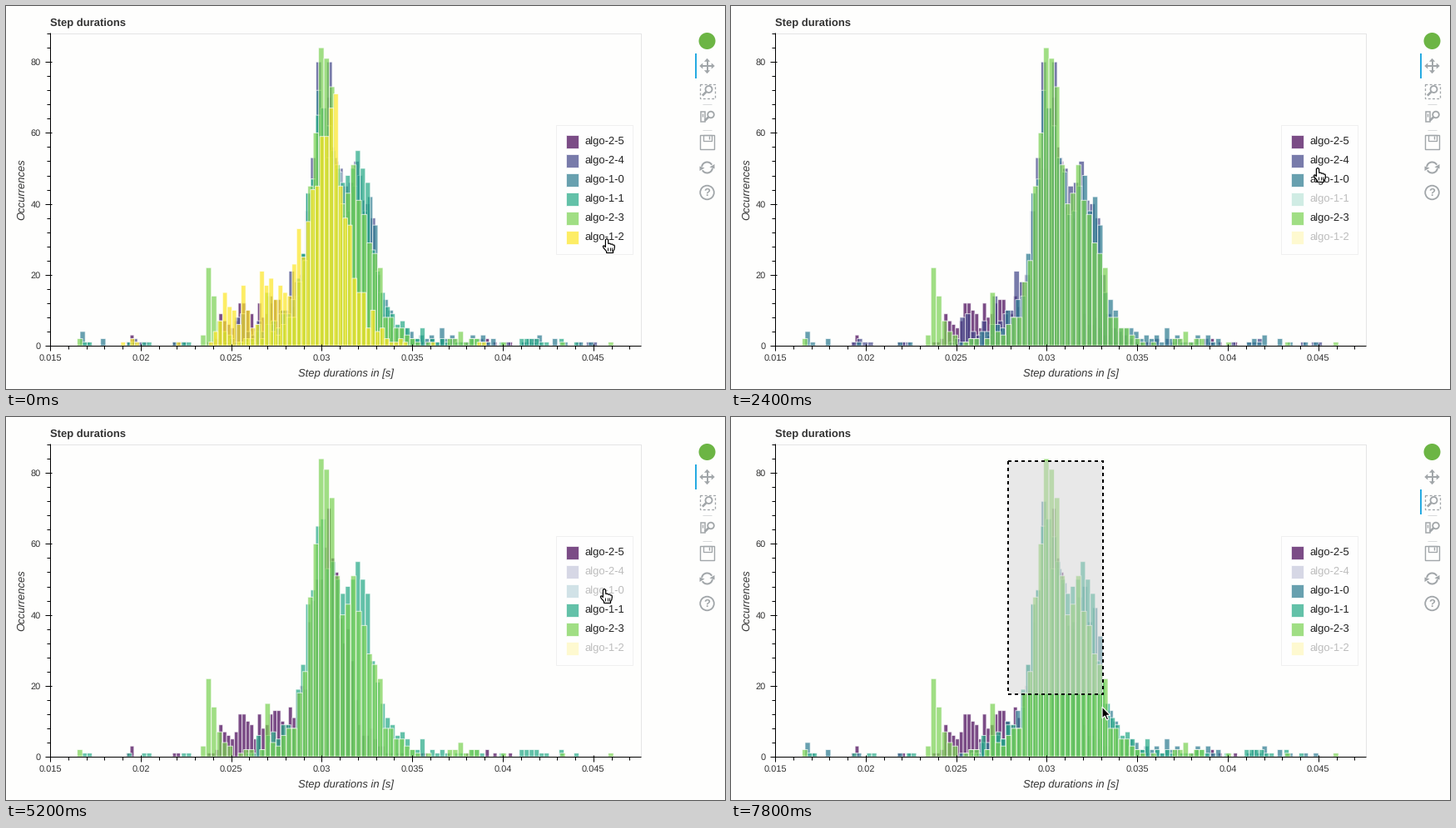
These frames come from a looping animation (864 by 460 pixels, 8 s). A matplotlib script:

```python
import numpy as np
import matplotlib.pyplot as plt
from matplotlib.animation import FuncAnimation
from matplotlib.collections import PolyCollection
from matplotlib.patches import Arc, Circle, Polygon, Rectangle

W, H, DPI = 864, 460, 80
STEP, FRAMES = 200, 40
PX = 72 / DPI  # points per pixel
LEFT, RIGHT, TOP, BASE = 53, 763, 32, 408
UNIT_X, UNIT_Y = 21.76, 4.26  # pixels per 0.001 s and per occurrence
GREY = "#a1a6a9"

plt.rcParams["font.family"] = "Liberation Sans"
plt.rcParams["text.hinting"] = "none"

fig = plt.figure(figsize=(W / DPI, H / DPI), dpi=DPI, facecolor="#fefefd")
ax = fig.add_axes([0, 0, 1, 1])
ax.set_xlim(0, W)
ax.set_ylim(H, 0)
ax.axis("off")


def line(xs, ys, color="black", lw=1.0, z=4, **kw):
    kw.setdefault("solid_capstyle", "butt")
    return ax.plot(xs, ys, color=color, lw=lw * PX, zorder=z, **kw)[0]


def box(x0, y0, x1, y1, z=4, lw=1.0, **kw):
    return ax.add_patch(Rectangle((x0, y0), x1 - x0, y1 - y0, lw=lw * PX, zorder=z, **kw))


def poly(pts, z=5, lw=1.0, **kw):
    return ax.add_patch(Polygon(pts, closed=True, lw=lw * PX, zorder=z, **kw))


def label(x, y, s, size, **kw):
    opts = dict(ha="center", va="center_baseline", color="#333333", zorder=5)
    opts.update(kw)
    return ax.text(x, y, s, fontsize=size * PX, **opts)


def histogram(name, color, x0, width, runs):
    """Bars of one series; runs maps the first bin of a run to its counts."""
    quads = []
    for first, counts in runs.items():
        for k, n in enumerate(counts, first):
            if n:
                a, b, top = x0 + k * width, x0 + (k + 1) * width, BASE - n * UNIT_Y
                quads.append([(a, BASE), (a, top), (b, top), (b, BASE)])
    bars = PolyCollection(quads, facecolors=[(*color, 0.7)], edgecolors=[(1, 1, 1, 0.7)],
                          linewidths=PX, zorder=2)
    bars.set_snap(False)
    ax.add_collection(bars, autolim=False)
    return name, color, bars


def rgb(code):
    return tuple(int(code[i:i + 2], 16) / 255 for i in (0, 2, 4))


series = [
    histogram("algo-2-5", rgb("440154"), 144.5, 4.64, {
        0: [1, 3], 12: [1, 1], 21: [1, 1, 2],
        24: [9, 7, 6, 5, 7, 12, 12, 10, 9, 5, 12, 8, 9, 12, 13, 13, 10, 9, 14, 11],
        44: [18, 20, 19, 38, 44, 50, 50, 59, 70, 56, 52, 39, 32, 36, 27, 16, 9, 6, 6, 8],
        64: [5, 3, 3, 1, 1, 0, 1, 1], 76: [1, 1], 83: [1], 88: [1], 93: [2], 95: [1], 99: [1]}),
    histogram("algo-2-4", rgb("404387"), 145, 6.5, {
        0: [1, 2, 1, 1], 9: [1, 1], 18: [1, 2, 8, 9, 4, 3, 7, 3, 14, 7, 9, 10],
        30: [21, 18, 20, 38, 53, 80, 67, 80, 53, 50, 45, 46, 52, 41, 40, 36, 20, 9],
        48: [5, 4, 3, 2, 1, 1], 55: [1, 2, 0, 2, 1, 2, 1, 1], 65: [2, 1], 70: [1],
        73: [1, 1, 2], 83: [1, 0, 1, 1]}),
    histogram("algo-1-0", rgb("29788e"), 89, 6.17, {
        0: [4, 1], 4: [2], 10: [1], 18: [1, 0, 1], 30: [1, 1, 2, 2, 4, 4, 6, 6, 5, 10],
        40: [8, 13, 14, 26, 43, 47, 72, 67, 62, 53, 49, 37, 38, 45, 48, 38, 42, 34],
        58: [15, 13, 10, 5, 5, 5, 4, 2, 3, 2, 3, 1, 5, 2, 3, 1, 0, 1, 3, 0, 3, 1, 2],
        86: [1, 2, 1, 3], 92: [2], 94: [1], 97: [1, 0, 1]}),
    histogram("algo-1-1", rgb("22a784"), 91.5, 5.97, {
        0: [1, 1], 9: [1, 0, 0, 1, 1], 20: [1, 1], 33: [1, 1, 6, 2, 6, 7, 5, 9, 9, 8],
        43: [19, 26, 43, 47, 65, 67, 53, 55, 50, 46, 48, 50, 55, 50, 46, 27, 21, 15],
        61: [11, 9, 6, 7, 5, 2, 2, 5, 0, 2, 1, 2, 1], 75: [1, 1, 0, 2, 2, 1], 84: [1],
        88: [2, 2, 2, 2, 1, 1], 96: [2, 0, 0, 1]}),
    histogram("algo-2-3", rgb("79d151"), 85.6, 6.445, {
        0: [2], 23: [3, 22, 14, 7, 4, 3, 0, 1, 2, 2, 0, 2, 15, 4, 3, 6, 8, 8],
        41: [18, 24, 45, 60, 84, 81, 73, 51, 40, 43, 51, 41, 37, 29, 26, 22],
        57: [8, 8, 5, 5, 3, 2, 1, 0, 1], 69: [2, 2, 4, 1, 2, 2],
        79: [1], 90: [1], 99: [1]}),
    histogram("algo-1-2", rgb("fde724"), 138, 5.56, {
        0: [1, 0, 2, 1], 12: [1], 19: [1, 4, 7, 15, 11, 10, 6, 17, 10, 5, 6],
        30: [21, 17, 19, 13, 17, 15, 14, 23, 33, 25, 35, 44, 45, 59, 59, 67, 71],
        47: [45, 36, 34, 19, 15, 15, 5, 10, 4, 5, 2, 1, 1, 2, 1], 67: [1], 77: [1, 1]}),
]


def draw_axes():
    line([LEFT, RIGHT, RIGHT], [TOP + .5, TOP + .5, BASE], "#e5e5e5")
    line([LEFT, LEFT], [TOP, BASE])
    line([LEFT, RIGHT], [BASE, BASE])
    for i in range(33):
        x, major = LEFT + i * UNIT_X, i % 5 == 0
        line([x, x], [BASE - 2 * major, BASE + (6 if major else 4)])
        if major:
            label(x, 422, f"{0.015 + i / 1000:.3f}".rstrip("0"), 11)
    for n in range(0, 89, 4):
        y, major = BASE - n * UNIT_Y, n % 20 == 0
        line([LEFT - (6 if major else 4), LEFT + 2 * major], [y, y])
        if major:
            label(42, y, str(n), 11, ha="right")
    label(53, 24, "Step durations", 13, ha="left", va="baseline", weight="bold")
    label(408.5, 445, "Step durations in [s]", 13, va="baseline", style="italic")
    label(19, 220, "Occurrences", 13, va="center", style="italic", rotation=90)


def draw_legend():
    box(660.5, 142.5, 753, 298, z=3, fc="#fefefe", ec="#f0f0f0")
    veils = []
    for i, (name, color, _) in enumerate(series):
        y = 162.5 + 23 * i
        box(672.5, y - 7.5, 688, y + 8, fc=(*color, 0.7), ec=(1, 1, 1, 0.7))
        label(695, y + 4, name, 13, ha="left", va="baseline", color="#222222")
        veils.append(box(662, y - 11, 752, y + 11, z=6, lw=0, fc=(1, 1, 1, 0.7)))
    return veils


def magnifier(x, y, r):
    ax.add_patch(Circle((x, y), r, fill=False, ec=GREY, lw=1.8 * PX, zorder=5))
    line([x - .7 * r, x - 1.9 * r], [y + .7 * r, y + 1.9 * r], GREY, 2.6)


def draw_toolbar():
    ax.add_patch(Circle((842.5, 42), 10, color="#6cb544", lw=0, zorder=4))
    for y in (118, 148.5):
        line([837, 848], [y, y], "#d8dadb")

    # pan
    line([835, 850], [72, 72], GREY, 2)
    line([842.5, 842.5], [64.5, 79.5], GREY, 2)
    for a in range(4):
        c, s = np.cos(a * np.pi / 2), np.sin(a * np.pi / 2)
        poly([(842.5 + c * u - s * v, 72 + s * u + c * v)
              for u, v in ((9.2, 0), (5.2, -3.6), (5.2, 3.6))], lw=0, fc=GREY)

    # box zoom
    box(834, 94, 851.5, 110.5, fill=False, ec=GREY, lw=1.3, ls=(0, (2.2, 1.8)))
    magnifier(844.5, 100, 4)

    # wheel zoom
    box(834.5, 127, 840, 138.5, fill=False, ec=GREY, lw=1.5)
    line([837.2, 837.2], [129, 132.5], GREY, 1.4)
    magnifier(847, 130.5, 3.8)

    # save
    box(834, 155, 851, 172, fill=False, ec=GREY, lw=1.4)
    box(838, 155, 847.5, 161.5, fill=False, ec=GREY, lw=1.3)
    line([845, 845], [156, 160], GREY, 1.4)

    # reset
    for a in (190, 10):
        ax.add_patch(Arc((842.5, 194), 13, 13, theta1=a, theta2=a + 140,
                         color=GREY, lw=2 * PX, zorder=5))
    poly([(851.5, 190), (845.5, 193.5), (851.5, 195.5)], lw=0, fc=GREY)
    poly([(833.5, 198), (839.5, 194.5), (833.5, 192.5)], lw=0, fc=GREY)

    # help
    ax.add_patch(Circle((842.5, 224), 8.3, fill=False, ec=GREY, lw=1.8 * PX, zorder=5))
    label(842.5, 228.5, "?", 13, va="baseline", color=GREY, weight="bold")
    return box(827.5, 57, 829.5, 87, lw=0, fc="#26aae1")


HAND = np.array([(-1.6, .6), (0, -.6), (1.6, .6), (1.8, 5.4), (4, 5.2), (4.7, 6.2), (6.6, 6),
                 (7.3, 7), (9, 7.2), (9.4, 9), (8.8, 12.5), (7.5, 14.5), (7.5, 16.5),
                 (-.3, 16.5), (-.5, 14.5), (-4, 10.5), (-4.6, 8.4), (-3.3, 7.8), (-1.6, 9.5)])
ARROW = np.array([(0, 0), (0, 14), (3.2, 11), (5.4, 16), (7.7, 15), (5.6, 10.3), (9.9, 10.3)])

# pointer stops: time in ms, x, y
STOPS = np.array([
    (0, 722, 280), (600, 722, 279), (1600, 706, 201), (2000, 706, 227), (2200, 706, 227),
    (2400, 705, 195), (2800, 705, 203), (3200, 706, 182), (3600, 706, 182), (4200, 709, 232),
    (4800, 709, 230), (5200, 719, 207), (5400, 719, 207), (6000, 842, 103), (6400, 842, 103),
    (7200, 332, 52), (7400, 352, 75), (7600, 400, 195), (7800, 446, 348)])

HIDDEN = {"algo-1-2": (600, 8000), "algo-1-1": (2200, 4600),
          "algo-1-0": (2800, 5400), "algo-2-4": (3400, 8000)}
PICK_ZOOM, DRAG = 6200, 7400


def pointer(t):
    i = min(np.searchsorted(STOPS[:, 0], t, side="right") - 1, len(STOPS) - 2)
    (t0, *a), (t1, *b) = STOPS[i], STOPS[i + 1]
    u = (1 - np.cos(np.pi * (t - t0) / (t1 - t0))) / 2
    return np.array(a) + (np.array(b) - np.array(a)) * u


draw_axes()
veils = draw_legend()
active = draw_toolbar()
zoom_fill = box(332.5, 52.5, 333, 53, z=7, lw=0, fc=(0.83, 0.83, 0.83, 0.5))
zoom_edge = box(332.5, 52.5, 333, 53, z=7, lw=2, fill=False, ec="black", ls=(0, (2, 2)))
hand = poly(HAND, z=9, lw=1.2, fc="white", ec="black", joinstyle="round")
folds = [line([0, 0], [0, 0], lw=0.9, z=10) for _ in range(3)]
arrow = poly(ARROW, z=9, lw=1.2, fc="black", ec="white")


def update(i):
    t = i * STEP
    for (name, _, bars), veil in zip(series, veils):
        start, end = HIDDEN.get(name, (0, 0))
        off = start <= t < end
        bars.set_visible(not off)
        veil.set_visible(off)
    active.set_y(87 if t >= PICK_ZOOM else 57)

    x, y = pointer(t)
    on_link = bool(660 <= x <= 753 and 142 <= y <= 298 or x > 828)
    hand.set_xy(HAND + (x, y))
    arrow.set_xy(ARROW + (x, y))
    hand.set_visible(on_link)
    arrow.set_visible(not on_link)
    for k, fold in enumerate(folds):
        fx = x + 1.2 + 2.3 * k
        fold.set_data([fx, fx], [y + 10, y + 13.5])
        fold.set_visible(on_link)

    # the selection trails the pointer a little while it moves fast
    lag = np.clip((y - 75) / 273, 0, 1)
    for part in (zoom_fill, zoom_edge):
        part.set_visible(t >= DRAG)
        part.set_width(x - 335.5 + 3.5 * lag)
        part.set_height(y - 55.5 - 12.5 * lag)
    return []


anim = FuncAnimation(fig, update, frames=FRAMES, interval=STEP, repeat=True,
                     repeat_delay=0, blit=False, init_func=lambda: update(0))
plt.show()
```
